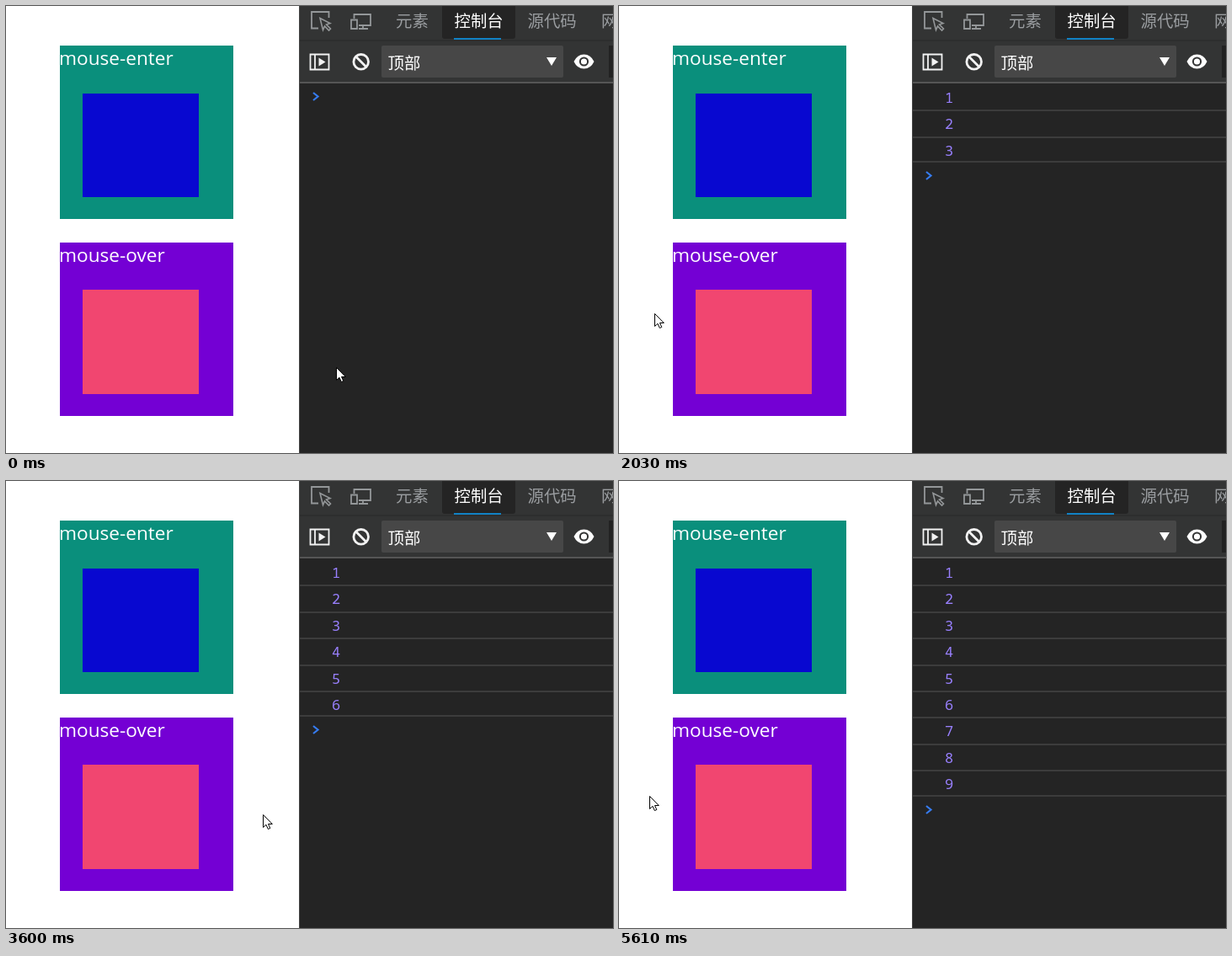
These frames come from a looping animation (721x531 px, 5920 ms). An HTML page:

```html
<!DOCTYPE html>
<html lang="zh">
<head>
<meta charset="utf-8">
<title>mouse-enter / mouse-over</title>
<style>
  html, body { margin: 0; width: 100%; height: 100%; overflow: hidden; background: #fff; }
  .scene, .console, .log, .tail, .cursor { position: absolute; }
  .scene { left: 0; top: 0; }
  .label { font: 22.6px "Open Sans", "Noto Sans", sans-serif; fill: #fff; }
  .ui { font: 19.4px "Noto Sans CJK SC", "Noto Sans CJK", sans-serif; fill: #9a9da0; }
  .ui .on { fill: #fff; }

  .console { left: 348px; top: 0; width: 373px; height: 531px; overflow: hidden;
    background: #242424; border-left: 1px solid #444; box-sizing: border-box; }
  .log { margin: 0; padding: 0; left: 0; top: 94px; width: 100%; list-style: none; }
  .log li { height: 31.4px; box-sizing: border-box; border-bottom: 2px solid #3c3c3c;
    padding-left: 38px; font: 17px/29px "Noto Sans Mono", monospace; color: #9980ff; }

  /* Covers the rows that are not logged yet. */
  .tail { --n: 0; left: 0; width: 100%; height: 531px; box-sizing: border-box;
    background: #242424; border-top: 2px solid #3c3c3c;
    top: 90px; animation: grow 5920ms step-end infinite; }
  .tail svg { position: absolute; left: 14px; top: 9px; }
  @keyframes grow {
    0%     { top: 90px; }
    16.55% { top: 121.4px; }
    18.41% { top: 152.8px; }
    26.18% { top: 184.2px; }
    39.36% { top: 215.6px; }
    41.81% { top: 247px; }
    48.14% { top: 278.4px; }
    69.09% { top: 309.8px; }
    72.64% { top: 341.2px; }
    80.91%, 100% { top: 372.6px; }
  }

  .cursor { left: 392px; top: 429px; animation: move 5920ms linear infinite; }
  @keyframes move {
    0%     { left: 392px; top: 429px; }
    8.3%   { left: 392px; top: 429px; animation-timing-function: cubic-bezier(.4, .1, .75, .65); }
    12.67% { left: 342px; top: 399px; }
    18.58% { left: 225px; top: 398px; }
    22.97% { left: 157px; top: 386px; animation-timing-function: cubic-bezier(.3, .35, .7, 1); }
    29.5%  { left: 41px;  top: 365px; }
    33.8%  { left: 41px;  top: 365px; animation-timing-function: cubic-bezier(.45, .05, .75, .5); }
    42.74% { left: 104px; top: 373px; }
    44.1%  { left: 124px; top: 376px; animation-timing-function: cubic-bezier(.35, .4, .6, 1); }
    53.04% { left: 314px; top: 393px; }
    57.3%  { left: 314px; top: 393px; animation-timing-function: ease-in; }
    60.82% { left: 305px; top: 396px; animation-timing-function: ease-out; }
    67.06% { left: 273px; top: 397px; animation-timing-function: cubic-bezier(.4, .2, .75, .65); }
    77.53% { left: 140px; top: 389px; }
    79.06% { left: 111px; top: 388px; animation-timing-function: cubic-bezier(.25, .5, .6, 1); }
    87.84% { left: 43px;  top: 374px; }
    90.03% { left: 39px;  top: 374px; }
    93.8%  { left: 39px;  top: 374px; }
    94.7%, 100% { left: 36px; top: 374px; }
  }
</style>
</head>
<body>
<div class="console">
  <ol class="log">
    <li>1</li><li>2</li><li>3</li><li>4</li><li>5</li><li>6</li><li>7</li><li>8</li><li>9</li>
  </ol>
  <div class="tail">
    <svg width="12" height="14"><path d="M2 2L7.5 6.5L2 11" fill="none" stroke="#367cf1" stroke-width="2.2"/></svg>
  </div>
</div>

<svg class="scene" width="721" height="531" viewBox="0 0 721 531">
  <path fill="#0a8f7c" d="M64 47h206v206H64z"/>
  <path fill="#0808d0" d="M91 104h138v123H91z"/>
  <path fill="#7400d4" d="M64 281h206v206H64z"/>
  <path fill="#f14670" d="M91 337h138v124H91z"/>
  <text class="label" x="63" y="70">mouse-enter</text>
  <text class="label" x="63" y="304">mouse-over</text>

  <!-- tab strip and toolbar -->
  <path fill="#333434" d="M349 0h372v90H349z"/>
  <path fill="#2d2e2e" d="M349 40h372v2H349z"/>
  <path fill="#555" d="M349 90h372v2H349z"/>
  <path fill="#242424" d="M518 0h87v36q0 3-3 3h-81q-3 0-3-3z"/>
  <path fill="#1182c5" d="M532 38h56v2h-56z"/>
  <rect x="446" y="47" width="216" height="38" rx="2" fill="#474747"/>
  <path fill="#222" d="M716 47h5v38h-5z"/>
  <g class="ui">
    <text x="463" y="25.3">元素</text>
    <text class="on" x="532.5" y="25.3">控制台</text>
    <text x="619.5" y="25.3">源代码</text>
    <text x="707" y="25.3">网络</text>
    <text class="on" x="453.5" y="74.5">顶部</text>
  </g>

  <!-- icons -->
  <g fill="none" stroke="#949799" stroke-width="1.8">
    <path d="M371 26.5H363V7H383.5V14"/>
    <path d="M373 14.5L385 20.5L380.5 22L385.5 27L383.5 29L378.5 24L376.5 28.5Z" stroke-width="1.6"/>
    <path d="M413.5 15V10H433V23H419M424 23V27M419 27H430"/>
    <path d="M410 16.5H417V27H410Z"/>
  </g>
  <g fill="none" stroke="#f2f2f2">
    <path d="M361.5 57.5H383.5V75.5H361.5ZM367 57V76" stroke-width="1.8"/>
    <path d="M415.5 60L428 72.5" stroke-width="2.8"/>
    <circle cx="421.7" cy="66.3" r="8.8" stroke-width="2.8"/>
  </g>
  <path fill="#f2f2f2" d="M371.5 61.5L379.5 66.5L371.5 71.5Z"/>
  <path fill="#fff" d="M642 61h12l-6 10z"/>
  <path fill="#fff" d="M674.5 66Q678.5 57.5 686.5 57.5T698.5 66Q694.5 74.5 686.5 74.5T674.5 66Z"/>
  <circle cx="686.5" cy="66" r="4.6" fill="#fff" stroke="#333434" stroke-width="2"/>
</svg>

<svg class="cursor" width="13" height="19">
  <path d="M.5 .5V15.5L4 12.3L6.3 17.5L8.8 16.5L6.5 11.5H11.3Z" fill="#fff" stroke="#000"/>
</svg>
</body>
</html>
```
